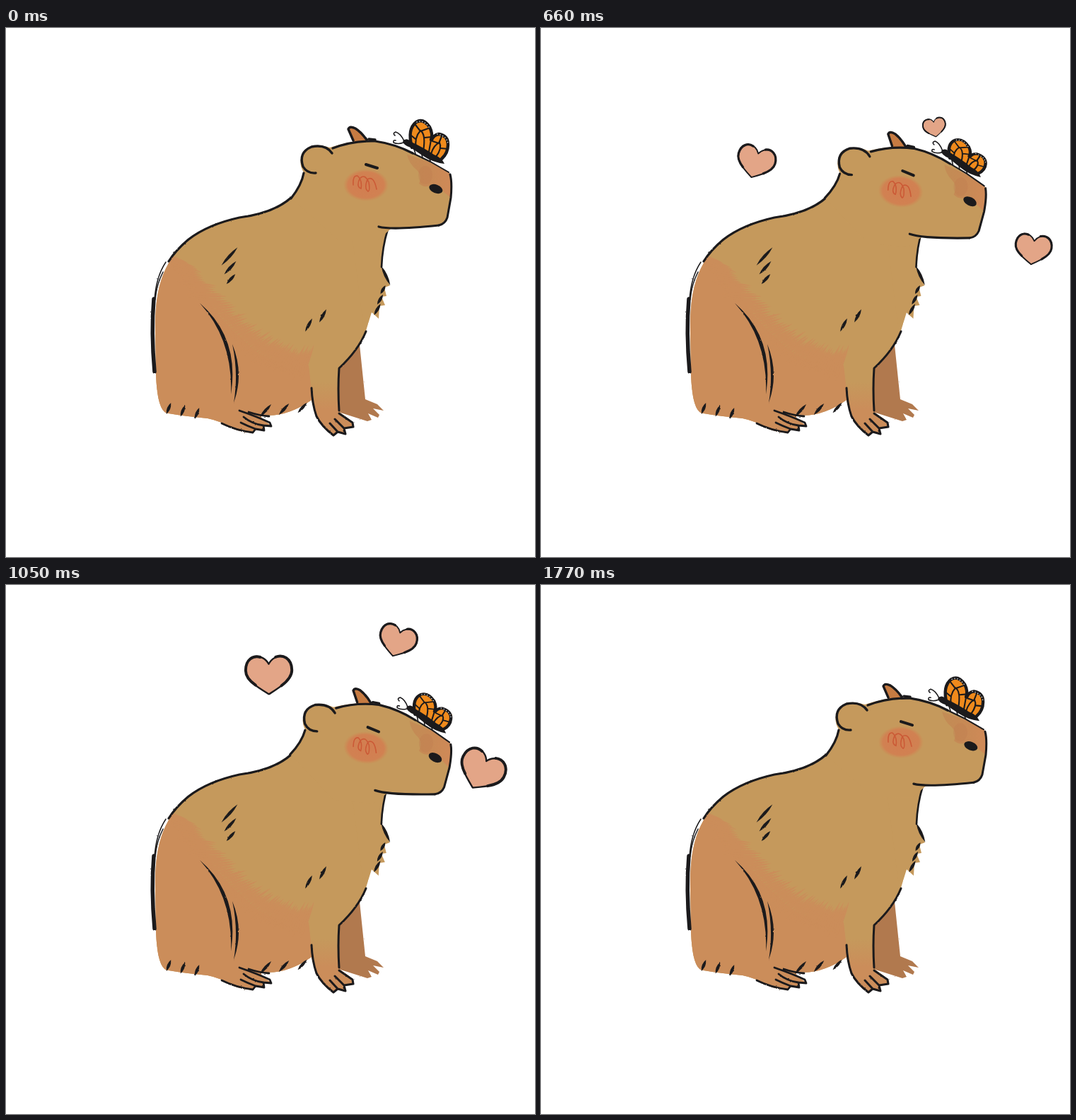
These frames come from a looping animation (748x748 px, 1800 ms). An HTML page:

```html
<!DOCTYPE html>
<html lang="en">
<head>
<meta charset="utf-8">
<title>Capybara and hearts</title>
<style>
  html, body { margin: 0; width: 100%; height: 100%; overflow: hidden; background: #fff; }
  svg { display: block; width: 100vw; height: 100vh; }
  .line { fill: none; stroke: #1b1a1c; stroke-linecap: round; stroke-linejoin: round; }
</style>
</head>
<body>
<svg viewBox="0 0 748 748">
  <defs>
    <path id="bodyShape" d="M403 240 Q378 262 330 268 Q285 278 258 299 Q236 318 226 340 Q211 370 211 420
      L212 490 Q214 545 230 545 Q252 549 285 552 Q305 556 322 567 Q338 573 349 572 L353 568 L365 569
      L364 563 L376 563 L362 553 L360 547 Q395 552 432 526 L437 545 Q446 562 463 577 L469 572 L480 575
      L478 567 L492 564 L485 553 L471 543 L470 482 Q500 455 509 428 L517 402 L531 340 L536 290 L510 230 L430 220 Z"/>
    <clipPath id="bodyClip"><use href="#bodyShape"/></clipPath>
    <radialGradient id="blush">
      <stop offset="0" stop-color="#d37d50"/>
      <stop offset=".8" stop-color="#d37d50" stop-opacity=".85"/>
      <stop offset="1" stop-color="#d08550" stop-opacity="0"/>
    </radialGradient>
    <linearGradient id="paw" x2="0" y2="1">
      <stop offset="0" stop-color="#cb8d5a" stop-opacity="0"/>
      <stop offset=".5" stop-color="#cb8d5a"/>
    </linearGradient>
    <linearGradient id="snout">
      <stop offset="0" stop-color="#c07d4d" stop-opacity=".45"/>
      <stop offset="1" stop-color="#d08a58"/>
    </linearGradient>
    <filter id="rough" x="-5%" y="-5%" width="110%" height="110%" color-interpolation-filters="sRGB">
      <feTurbulence type="fractalNoise" baseFrequency=".25" numOctaves="2"/>
      <feDisplacementMap in="SourceGraphic" scale="1.8" xChannelSelector="R" yChannelSelector="G"/>
    </filter>
    <g id="heart">
      <path class="line" style="fill:#e3a587" stroke-width="2.4" d="M0 -15 C8 -31 33 -31 33 -6 C33 8 16 18 0 28 C-16 18 -33 8 -33 -6 C-33 -31 -8 -31 0 -15Z"/>
      <path class="line" stroke-width="4" d="M10 -25 C20 -29 33 -23 33 -6 C33 3 26 10 18 16 M-12 -25 C-22 -28 -33 -22 -33 -6 C-33 3 -26 10 -19 15"/>
    </g>
  </defs>

  <g filter="url(#rough)">
    <path fill="#b1794e" d="M500 448 L508 525 L525 532 L534 541 L519 538 L528 547 L526 551 L512 545 L517 554 L511 556 L470 543 L468 478Z"/>
    <use href="#bodyShape" fill="#c5995c"/>
    <g id="hatch" clip-path="url(#bodyClip)" fill="#cb8d5a">
      <path d="M190 300 L236 324 Q268 345 285 380 Q300 412 335 440 Q360 470 400 472 L428 477 L434 530 L440 600 H190Z"/>
      <rect x="432" y="500" width="65" height="80" fill="url(#paw)"/>
    </g>
    <path class="line" stroke-width="3.2" d="M403 240 Q378 262 330 268 Q285 278 258 299 Q240 314 230 330"/>
    <path class="line" stroke-width="1.5" d="M226 331 Q212 352 210 385 M222 345 Q213 362 211 384"/>
    <path class="line" stroke-width="5.5" d="M209 383 Q205 430 210 486"/>
    <path class="line" stroke-width="2.8" d="M305 559 Q325 569 349 572 L353 567 Q342 563 332 558 M353 567 L365 569 L364 562 Q348 560 336 550
      M364 562 L375 563 L373 558 Q356 550 330 541 M372 549 Q358 548 343 543"/>
    <path class="line" stroke-width="3" d="M432 509 Q433 532 439 549 Q446 563 463 576 L469 571 L458 559 M469 571 L480 574 L478 566 L465 553
      M478 566 L491 564 L490 558 L471 545 M509 429 Q498 456 471 481 Q469 510 471 541"/>
    <g id="ticks" fill="#1b1a1c"></g>
  </g>

  <g id="chest">
    <path fill="#c5995c" d="M540 284 Q531 312 531 338 L543 364 L535 367 L538 379 L531 380 L536 392 L528 393 L527 411 L517 402 L505 420 L490 300Z"/>
    <path class="line" stroke-width="2.6" d="M540 284 Q532 310 531 338"/>
    <g id="fur" fill="#1b1a1c"></g>
  </g>

  <g id="hearts"></g>

  <g id="head">
    <path fill="#c67b42" d="M484 141 Q492 138 500 147 L513 160 L491 163Z"/>
    <path class="line" stroke-width="3.4" d="M491 159 L484 143 Q486 138 494 142 Q502 147 510 158 M513 157 L522 158"/>
    <path fill="#c5995c" d="M403 241 Q418 222 421 204 Q412 190 421 176 Q435 162 458 169 Q490 158 520 160
      Q550 164 575 177 L600 190 L627 205 Q631 215 629 238 L624 268 Q622 276 616 278 Q580 283 544 284 L526 300 H470 Z"/>
    <path fill="url(#snout)" d="M567 179 L600 190 L627 205 Q630 216 629 240 L619 232 Q608 218 602 221 Q594 228 584 220 Q589 208 580 200 Q570 192 567 179Z"/>
    <ellipse cx="593" cy="208" rx="10" ry="13" fill="#c17b50" opacity=".35"/>
    <ellipse cx="509" cy="222" rx="32" ry="23" fill="url(#blush)"/>
    <path fill="none" stroke="#cb5a36" stroke-width="1.6" stroke-linecap="round"
      d="M491 222 Q490 208 497 209 Q504 215 502 227 Q495 225 500 213 Q507 205 513 218 Q515 230 512 231 Q506 227 511 214 Q520 208 524 228"/>
    <path class="line" stroke-width="4" d="M509 193 L525 198"/>
    <ellipse cx="608" cy="227.5" rx="10" ry="6" transform="rotate(22 608 227)" fill="#1b1a1c"/>
    <path class="line" stroke-width="3.2" d="M403 241 Q418 222 421 205 M462 170 Q490 159 522 160 Q550 164 575 177"/>
    <path class="line" stroke-width="3.4" d="M461 177 Q452 164 432 168 Q413 176 420 196 Q426 206 438 205"/>
    <path class="line" stroke-width="2" d="M575 177 L600 189 L626 204"/>
    <path class="line" stroke-width="3" d="M628 207 Q631 218 629 240 L624 268 Q621 277 612 279"/>
    <path class="line" stroke-width="3.2" d="M527 281 Q546 286 612 279"/>

    <path class="line" stroke-width="1.6" d="M563 160 Q558 149 551 147 Q546 149 550 152 M562 162 Q554 165 548 162 Q547 158 551 159
      M576 168 L579 178 M587 174 L589 184 M597 179 L600 188"/>
    <g id="wings">
      <path fill="#ef8a1c" d="M600 178 Q595 160 605 152 Q618 147 626 158 Q629 172 616 185 Z"/>
      <path fill="#ef8a1c" d="M574 169 Q567 143 580 133 Q590 127 599 140 Q606 152 600 177 Z"/>
      <path class="line" stroke-width="4.4" d="M574 169 Q567 143 580 133 Q590 127 599 140 Q604 150 601 158 M602 158 Q605 151 612 150 Q625 152 625 165 Q625 177 616 185"/>
      <path class="line" stroke-width="2.1" d="M580 170 Q577 155 586 145 Q594 150 590 174 M573 152 L579 157 M579 137 L586 146 L597 142 M592 155 L602 154
        M601 178 Q605 165 613 162 Q617 170 608 182 M603 160 L612 163 L616 153 M615 170 L625 171 M598 175 L601 158"/>
      <path fill="none" stroke="#fff" stroke-width="1.5" stroke-linecap="round" stroke-dasharray="0 4" d="M581 133 Q590 129 598 140 M610 150 Q624 153 625 164"/>
    </g>
    <path fill="#1b1a1c" d="M561 160 Q566 154 573 161 Q592 170 605 179 Q616 183 620 192 Q603 190 590 181 L572 169 Q562 166 561 160Z"/>
  </g>
</svg>
<script>
const $ = id => document.getElementById(id);
const { sin, cos, PI } = Math;
const LOOP = 1800, STEP = 30, TURN = 2 * PI;

// A brush mark from one point to another, tapered at both ends; w is its middle thickness.
function lens(x1, y1, x2, y2, w, bendX = 0, bendY = 0) {
  const len = Math.hypot(x2 - x1, y2 - y1);
  const nx = (y1 - y2) / len * w, ny = (x2 - x1) / len * w;
  const cx = (x1 + x2) / 2 + bendX, cy = (y1 + y2) / 2 + bendY;
  return `<path d="M${x1} ${y1}Q${cx + nx} ${cy + ny} ${x2} ${y2}Q${cx - nx} ${cy - ny} ${x1} ${y1}"/>`;
}

function tick(x, y, len, degrees, w = 4.5) {
  const dx = cos(degrees * PI / 180) * len / 2, dy = sin(degrees * PI / 180) * len / 2;
  return lens(x - dx, y - dy, x + dx, y + dy, w);
}

// Evenly spaced parallel ticks, each one longer or shorter than the last by a factor.
function row(count, x, y, dx, dy, len, degrees, factor = 1) {
  let out = '';
  for (let i = 0; i < count; i++) out += tick(x + i * dx, y + i * dy, len * factor ** i, degrees);
  return out;
}

$('ticks').innerHTML =
  row(3, 316, 323, 1, 16, 34, 132, .74) +     // shoulder
  row(2, 448, 407, -20, 13, 21, 118) +        // chest
  row(3, 230, 538, 20, 3.5, 17, 112) +        // rump
  row(3, 367, 541, 26, -2, 24, 132, .9) +     // belly
  lens(274, 389, 318, 518, 5, 30, -14) + lens(320, 447, 322, 530, 4, 12);
$('fur').innerHTML = tick(537, 350, 30, 65) + row(3, 533, 370, -4, 14, 14, 120, 1.15);

// Ragged fur where the two coat colours meet.
const rand = n => { const v = sin(n * 127.1) * 43758.5; return v - Math.floor(v); };
for (let i = 0; i < 60; i++) {
  const u = i / 59, x = 240 + 186 * u, y = 326 + 148 * sin(u * PI / 2);
  $('hatch').insertAdjacentHTML('beforeend', tick(x, y, 30 + 30 * rand(i + 1), 20 - 90 * u, 4));
}

// Each heart rises and slows, sways (lowest x at `left` of its life) and tilts.
const hearts = [
  { born: 240, life: 1200, x: 340, y: 278, rise: 1, size: 78, sway: 40, freq: 1, left: .28, tilt: 18, turns: 1 },
  { born: 570, life: 1050, x: 566, y: 157, rise: .7, size: 71, sway: 28, freq: 1, left: .28, tilt: 18, turns: 1 },
  { born: 330, life: 1110, x: 684, y: 368, rise: .72, size: 78, sway: 12, freq: 1.5, left: .62, tilt: 40, turns: .25 }
];
$('hearts').innerHTML = '<use href="#heart"/>'.repeat(hearts.length);

function drawHeart(h, node, t) {
  const u = (t - h.born) / h.life, alive = u > 0 && u < 1;
  node.style.display = alive ? '' : 'none';
  if (!alive) return;
  const x = h.x - h.sway * cos(TURN * h.freq * (u - h.left));
  const y = h.y - h.rise * (285 * u - 90 * u * u);
  const tilt = h.tilt * sin(TURN * h.turns * (u - .17));
  const width = h.size * u ** .3 * Math.min(1, (1 - u) * 6.25);
  node.setAttribute('transform', `translate(${x} ${y}) rotate(${tilt}) scale(${width / 70})`);
}

function draw(now) {
  const t = Math.floor(now % LOOP / STEP) * STEP, phase = TURN * t / LOOP;

  // One slow bow per loop with two quicker nods on top.
  const bow = sin(phase / 2) ** 2, nod = sin(phase) ** 2;
  const angle = 4.4 * bow + 3.05 * nod - .3 * sin(phase);
  const dx = 3 * bow, dy = -2 * bow * (1 - nod);
  $('head').setAttribute('transform', `translate(${dx} ${dy}) rotate(${angle} 400 195)`);
  $('chest').setAttribute('transform', `translate(${dx - .6 * angle})`);

  // The wings fold down onto the sloping body.
  const fold = .12 * bow + .24 * nod;
  $('wings').setAttribute('transform', `matrix(1 ${fold * .53} 0 ${1 - fold} 0 ${fold * -133})`);
  hearts.forEach((h, i) => drawHeart(h, $('hearts').children[i], t));
}

const start = performance.now();
function loop() {
  draw(performance.now() - start);
  requestAnimationFrame(loop);
}
loop();
</script>
</body>
</html>
```
